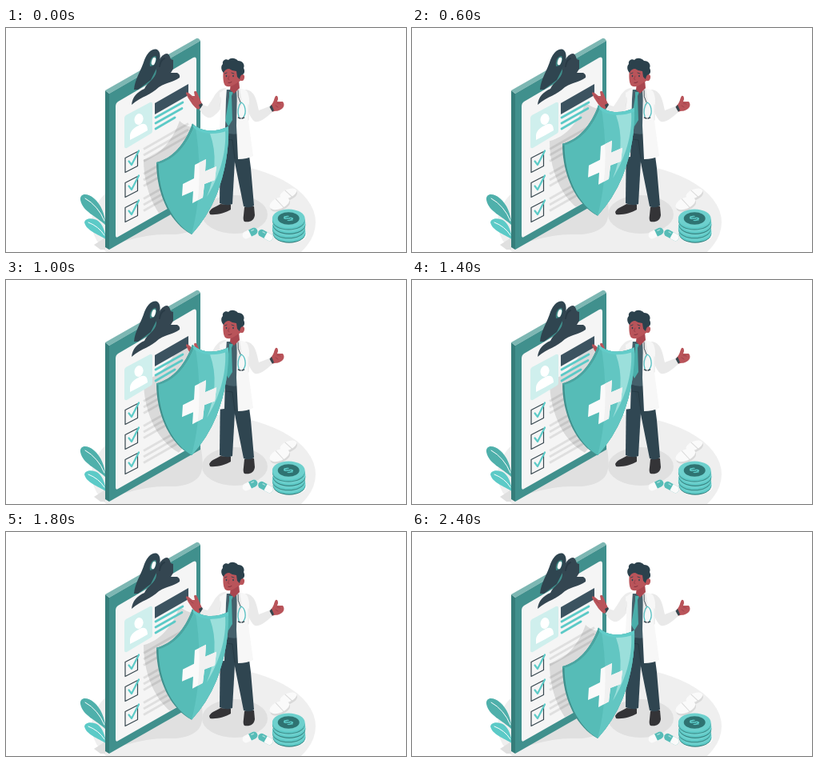
These frames come from a looping animation (500 by 280 pixels, 2600 ms). An HTML page with a canvas:

```html
<!DOCTYPE html>
<html lang="en">
<head>
<meta charset="utf-8">
<title>Health cover</title>
<style>
html, body { margin: 0; width: 100%; height: 100%; overflow: hidden; background: #fff; }
canvas { display: block; width: 500px; height: 280px; }
</style>
</head>
<body>
<canvas id="stage" width="500" height="280"></canvas>
<script>
const ctx = document.getElementById('stage').getContext('2d');
const STEP = 200, STEPS = 13, RISE = 7.75;
const TEAL = '#56bcb7', CYAN = '#5ccac7', DEEP = '#40908d', LIGHT = '#9bdfdb',
      DARK = '#37474f', NAVY = '#2f4550', SKIN = '#b9545a', COAT = '#f7f7f7', FOLD = '#e6e6e6';

function fill(d, color) {
  ctx.fillStyle = color;
  ctx.fill(new Path2D(d));
}

function line(d, color, width, cap = 'round') {
  ctx.strokeStyle = color;
  ctx.lineWidth = width;
  ctx.lineCap = cap;
  ctx.lineJoin = 'round';
  ctx.stroke(new Path2D(d));
}

function oval(x, y, rx, ry, color, turn = 0) {
  ctx.fillStyle = color;
  ctx.beginPath();
  ctx.ellipse(x, y, rx, ry, turn, 0, Math.PI * 2);
  ctx.fill();
}

// Runs a drawing shifted to (x, y), optionally rotated.
function at(x, y, draw, turn = 0) {
  ctx.save();
  ctx.translate(x, y);
  ctx.rotate(turn);
  draw();
  ctx.restore();
}

function clipped(d, draw) {
  ctx.save();
  ctx.clip(new Path2D(d));
  draw();
  ctx.restore();
}

function ground() {
  oval(247, 243, 140, 75, '#efefef');
  fill('M110 271L124 262V277L118 277Z', '#e0e0e0');
  fill('M140 268L243 206Q249 236 241 246Q230 259 203 258Q180 257 150 266Z', '#e0e0e0');
  oval(286, 233, 41, 24, '#e0e0e0');
}

function leaves() {
  fill('M125 247C113 235 96 230 93 215C92 206 102 206 110 213C119 221 123 231 125 247Z', '#4fb0ab');
  line('M99 213Q115 222 123 241', '#fff', 1);
  fill('M125 264C115 258 100 253 98 243C99 237 109 237 115 241C121 246 124 254 125 264Z', CYAN);
  line('M103 243Q116 248 123 259', '#fff', 1);
}

function board() {
  fill('M124 78L129 82V277L124 274Z', '#357d7a');
  fill('M124 78L238 13Q241 12 243 16L129 82Z', '#7db7b3');
  fill('M129 82L243 16V212L129 277Z', DEEP);
  fill('M137 98Q137 94 140 92L234 37Q238 35 238 40V202Q238 205 235 207L140 261Q137 263 137 259Z', '#f5f5f5');
}

function checkbox(y) {
  line(`M149 ${y}L164.500 ${y - 8}V${y + 10}L149 ${y + 18}Z`, DARK, 1.2);
  line(`M153.500 ${y + 4}L157 ${y + 8.5}L166 ${y - 9}`, CYAN, 2.2);
  for (let i = 0; i < 3; i++) {
    const top = y - 11 + i * 7.5;
    line(`M172 ${top}L228 ${top - 32}`, 'rgba(0,0,0,.09)', 3, 'butt');
  }
}

function form() {
  fill('M148 113Q148 110 150 109L180 93Q183 92 183 95V129Q183 131 181 132L151 150Q148 151 148 148Z', '#cfefed');
  oval(166, 114, 5.5, 7, '#fff', 0.25);
  fill('M155 140V134C156 127 162 124 167 121C173 118 177 120 177 128Q167 134 155 140Z', '#fff');
  fill('M186 94L228 70V84L186 108Z', '#3c5360');
  line('M187 112L221 93', CYAN, 2.7);
  line('M187 119L220 100.500', CYAN, 2.7);
  line('M187 126L211 112', CYAN, 2.7);
  [162.5, 193.5, 224.5].forEach(checkbox);
}

function clip() {
  fill('M160 77C161 64 169 53 173 40C177 30 183 25 189 27C194 30 193 39 191 45L181 65L165 77Z', NAVY);
  fill('M180 48C179 41 182 35 187 35C189 37 188 43 184 47Z', '#3d8582');
  oval(184.5, 41.5, 2.3, 5, '#fff', 0.3);
  fill('M157 96C158 86 164 80 173 76C176 68 187 64 188 54C188 45 193 33 201 32C204 32 205 36 206 39L209 40V51L206 56L214 56Q218 58 217 62C207 69 202 67 191 74C181 84 170 85 157 96Z', '#344651');
  line('M192 48Q193 40 198 38', '#293b46', 2);
}

function legs() {
  fill('M254 230C257 224 264 223 268 220L281 221V227C274 231 264 234 255 233Z', '#343437');
  fill('M298 224Q304 222 310 223L311 234C310 241 305 243 298 242Q296 240 297 234Z', '#343437');
  fill('M268 129L288 130L283 220Q276 223 267 219Z', '#304753');
  fill('M276 131L300 130L306 175L310 222Q304 226 297 223L284 158Z', NAVY);
  line('M275 139L283 140L286 163', '#243842', 0.8);
}

function hands() {
  fill('M240 102C233 97 231 92 228 88L225 82Q225 79 228 81L233 85L236 85L235 80Q237 77 239 81L242 88L246 97Z', SKIN);
  line('M229 85L234 89', '#963d48', 0.7);
  fill('M330 104L331 97C335 93 335 88 337 85Q340 84 340 89L339 92L346 92Q349 96 346 100C341 105 337 103 332 105Z', SKIN);
  line('M339 94L343 95M337 97L340 99', '#963d48', 0.7);
}

function coat() {
  fill('M274 77L292 77L290 132Q282 134 273 130Z', '#45606b');
  fill('M279 80L284 80L282 85L283 115L278 123L274 116L279 86Z', '#4aaeaa');
  fill('M241 96L245 94L249 103L244 105Z', DARK);
  fill('M329 99L332 96L335 103L331 106Z', DARK);
  fill('M275 75C266 75 262 82 258 89L252 98L246 96L242 102C245 108 250 113 256 112C263 109 269 101 274 91Z', '#ececec');
  fill('M276 75L275 89L273 161L265 162L268 105L267 81Z', COAT);
  line('M267 98Q269 92 268 87', FOLD, 1);
  fill('M299 77C311 78 313 89 316 103L329 98L333 105C324 113 318 118 311 117C305 113 302 102 299 93Z', '#e9e9e9');
  fill('M289 75L299 77Q304 80 304 92L303 116L309 160Q301 164 290 164L288 122Z', COAT);
  line('M303 96L303 115', FOLD, 1);
  fill('M288 76L292 74L295 94L290 106Z', '#e9e9e9');
  line('M290 78Q289 86 293 93', DARK, 0.9);
  line('M291 111C289 105 290 97 294 93C299 95 301 106 297 111', '#52bfc1', 1.3);
  line('M290.500 112L293 113M295 113L297.500 112', DARK, 1.5);
}

function head() {
  fill('M281 68L291 65L292 75L285 82L280 77Z', '#a9464f');
  fill('M272 51C271 59 271 68 274 72Q279 75 285 71L293 66L295 53L287 47Z', SKIN);
  oval(295, 62, 3, 4.2, SKIN, 0.2);
  fill('M272 56C269 53 268 48 271 45C270 41 274 38 278 40C281 36 288 38 290 41C296 41 299 46 297 50C299 54 298 57 296 58Q293 58 292 64L289 61L288 54Q283 54 279 51Q274 51 272 56Z', '#2b414c');
  oval(275.5, 60, 0.8, 1.2, NAVY);
  oval(284, 60, 0.8, 1.2, NAVY);
  line('M273.500 57L276 56M282 56L285 57', NAVY, 0.9);
  line('M279 60L277.500 64L279 64.500', '#8e3946', 0.7);
  line('M278 68.500Q280 69 282 67.500', '#7d2f3b', 0.9);
}

function tablet(x, y, rx, ry) {
  at(x, y, () => {
    oval(0, 2, rx, ry, '#d9d9d9');
    oval(0, -0.5, rx, ry, '#fafafa');
    line(`M-2 ${-ry}L3 ${ry}`, '#d9d9d9', 1);
  }, -0.4);
}

function capsule(x, y, turn, left, right) {
  at(x, y, () => {
    line('M-5.500 0H5.500', left, 9);
    clipped('M0 -6H12V6H0Z', () => line('M-5.500 0H5.500', right, 9));
    line('M-5 -2H-2M3 -2H6', 'rgba(255,255,255,.5)', 1.3);
  }, turn);
}

function coins() {
  oval(367, 258, 9, 8, '#fafafa', -0.4);
  for (let i = 3; i >= 0; i--) {
    const x = 353.5 + (i % 2 ? 0.5 : -0.3), y = 238 + i * 5.4;
    oval(x, y + 3, 20.3, 11.5, i % 2 ? '#3a8583' : DEEP);
    oval(x, y + 1.8, 20.3, 11.5, CYAN);
    oval(x, y, 20.3, 11.5, '#6dd0cd');
  }
  oval(353.2, 238, 13.5, 7.8, '#2f7372');
  ctx.save();
  ctx.transform(0.85, -0.45, 0.85, 0.45, 353.2, 238);
  ctx.font = 'bold 14px Inter, Arial, sans-serif';
  ctx.textAlign = 'center';
  ctx.textBaseline = 'middle';
  ctx.fillStyle = CYAN;
  ctx.fillText('$', 0, 0.5);
  ctx.restore();
}

const SHIELD = 'M233 119.500C243 130 262 131 278 123C279 150 274 181 263 209Q252 236 232 258C207 245 188 210 188 168C208 163 224 145 233 119.500Z';
const CROSS = 'M236 171L250 164L249 179L263 173L261 190L248 195L246 212L233 219L234 204L220 210L221 195L235 188Z';
const RIGHT_SIDE = 'M236 119C244 164 244 213 232 258L290 258V119Z';

function shieldShadow(rise) {
  clipped('M137 96L238 36V205L137 262Z', () =>
    at(-16, -3.5 - rise, () => fill(SHIELD, '#dadada')));
}

function shield(rise) {
  at(0, -rise, () => {
    fill(SHIELD, DEEP);
    clipped(SHIELD, () => {
      at(2.5, 1, () => fill(SHIELD, TEAL));
      fill(RIGHT_SIDE, '#62c6c2');
      fill('M255 132L274 128C276 157 266 187 251 211C262 184 264 157 255 132Z', LIGHT);
      line('M234 121C244 132 262 132 279 125', '#62ccc9', 4.5);
      line('M188 169C209 164 225 146 233 121', '#4aa5a1', 3);
    });
    fill(CROSS, '#fafafa');
    clipped(CROSS, () => fill(RIGHT_SIDE, '#f1f1f1'));
  });
}

function draw(rise) {
  ctx.fillStyle = '#fff';
  ctx.fillRect(0, 0, 500, 280);
  ground();
  leaves();
  board();
  shieldShadow(rise);
  form();
  clip();
  legs();
  hands();
  coat();
  head();
  tablet(353, 207.5, 11, 5.5);
  tablet(342, 219.5, 13, 7);
  capsule(305, 256.5, -0.45, '#fafafa', TEAL);
  capsule(324.5, 259, 0.5, TEAL, '#fafafa');
  coins();
  shield(rise);
}

function frame() {
  const step = Math.floor(performance.now() / STEP) % STEPS;
  draw(RISE * Math.min(step, STEPS - 1 - step));
  requestAnimationFrame(frame);
}
frame();
</script>
</body>
</html>
```
